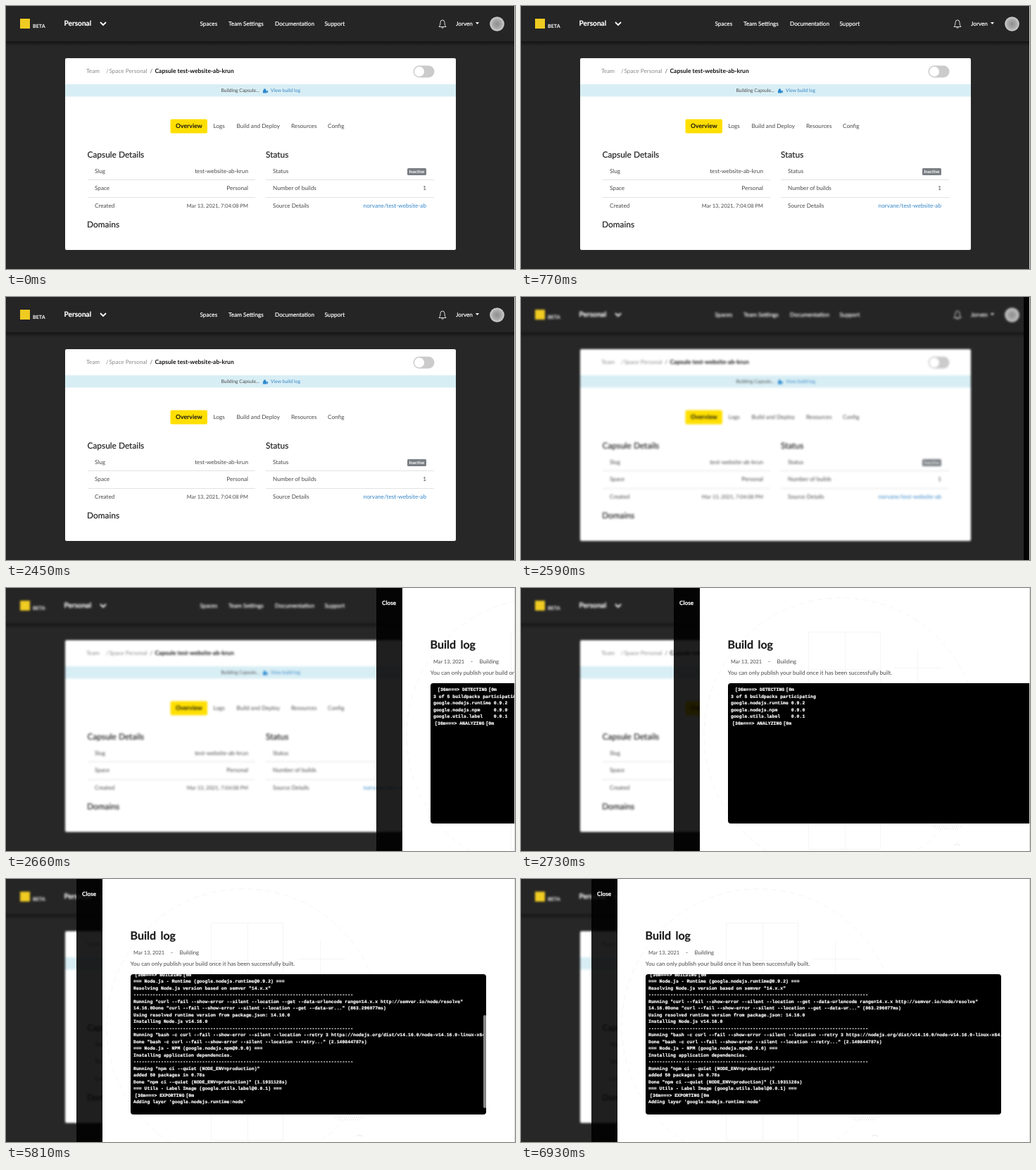
Animation of 723x373 px, one loop 8.54 s. Source, as an HTML page:

```html
<!DOCTYPE html>
<html lang="en">
<head>
<meta charset="utf-8">
<title>Build log</title>
<style>
  html, body { margin: 0; width: 100%; height: 100%; overflow: hidden; background: #272727; }
  .stage { position: relative; width: 723px; height: 373px; overflow: hidden; background: #272727; }
  svg { position: absolute; left: 0; top: 0; width: 723px; height: 373px; overflow: visible; }
  text { font: 8.2px Lato, sans-serif; fill: #4a4a4a; text-rendering: geometricPrecision; }
  .bold { font-weight: 700; }
  .white { fill: #fff; }
  .heavy { stroke: #fff; stroke-width: .2px; }
  .dark { fill: #111; }
  .muted { fill: #8b8b8b; }
  .link { fill: #3585c5; }
  .small { font-size: 6.8px; }
  .end { text-anchor: end; }
  .head { font-size: 11.9px; fill: #222; stroke: #222; stroke-width: .2px; }
  .title { font-size: 16px; word-spacing: 2.5px; fill: #1c1c1c; stroke: #1c1c1c; stroke-width: .2px; }
  .rule { stroke: #e2e2e2; stroke-width: 1; }

  .page, .panel, .thumb, .early, .late { animation: 8540ms step-end infinite; }
  .page { animation-name: blur; }
  .panel { position: absolute; inset: 0; animation-name: slide; }
  .early { animation-name: early; }
  .late { animation-name: late; }
  .thumb { animation-name: fade; }

  .term { position: absolute; left: 177px; top: 135px; width: 505px; height: 198.5px;
    border-radius: 4px; overflow: hidden; background: #000; }
  pre { position: absolute; left: 4px; margin: 0; color: #fff; white-space: pre;
    font: 700 6.5px/9.5px "Liberation Mono", monospace; text-rendering: geometricPrecision;
    -webkit-text-stroke: .22px #fff; }
  .early { top: 5px; }
  .late { top: -3.4px; }
  pre i { display: inline-block; width: 2.1px; }
  .thumb { position: absolute; right: .5px; top: 58px; width: 4px; height: 132px;
    border-radius: 2px; background: #858585; }
  .edge { position: absolute; left: 722px; top: 0; width: 1px; height: 373px; background: #dcdcdc; }

  @keyframes blur {
    0% { filter: blur(0); }
    28.688% { filter: blur(.5px); }
    29.508% { filter: blur(1px); }
    30.327%, 100% { filter: blur(1.4px); }
  }
  @keyframes slide {
    0% { transform: translateX(640px); }
    30.327% { transform: translateX(614px); }
    31.147% { transform: translateX(426px); }
    31.967% { transform: translateX(117px); }
    32.786%, 100% { transform: none; }
  }
  @keyframes early { 0% { opacity: 1; } 68.032%, 100% { opacity: 0; } }
  @keyframes late { 0% { opacity: 0; } 68.032%, 100% { opacity: 1; } }
  @keyframes fade {
    0% { opacity: 0; }
    68.032% { opacity: 1; }
    73.77% { opacity: .75; }
    74.59% { opacity: .5; }
    75.409% { opacity: .25; }
    76.229%, 100% { opacity: 0; }
  }
</style>
</head>
<body>
<div class="stage">
  <svg class="page" viewBox="0 0 723 373">
    <defs>
      <linearGradient id="shade" x2="0" y2="1">
        <stop stop-color="#141414"/><stop offset="1" stop-color="#272727"/>
      </linearGradient>
      <radialGradient id="portrait">
        <stop stop-color="#8d8d8d"/><stop offset=".6" stop-color="#a9a9a9"/><stop offset="1" stop-color="#d0d0d0"/>
      </radialGradient>
    </defs>
    <rect x="-10" y="-10" width="743" height="393" fill="#272727"/>
    <rect x="-10" y="-10" width="743" height="60" fill="#252525"/>
    <rect x="-10" y="50" width="743" height="7" fill="url(#shade)"/>

    <rect x="20" y="18" width="14" height="14" fill="#f0cb22"/>
    <text class="bold white" x="38" y="31" style="font-size:7.2px">BETA</text>
    <text class="bold white heavy" x="82.5" y="28" style="font-size:10.1px">Personal</text>
    <path d="M134 23l4 4 4-4" fill="none" stroke="#fff" stroke-width="1.8"/>
    <g class="bold heavy">
      <text class="white" x="275.5" y="27.5">Spaces</text>
      <text class="white" x="316" y="27.5">Team Settings</text>
      <text class="white" x="382" y="27.5">Documentation</text>
      <text class="white" x="452.5" y="27.5">Support</text>
      <text class="white" x="639" y="27.5">Jorven</text>
    </g>
    <path d="M615 29.5q2-1.5 2-6a3 3.6 0 0 1 6 0q0 4.5 2 6zM618.5 31h3" fill="none" stroke="#ddd"/>
    <path d="M667 23h5l-2.5 3z" fill="#fff"/>
    <circle cx="697.5" cy="25.5" r="10.3" fill="url(#portrait)"/>

    <rect x="84" y="74" width="555" height="272" rx="2" fill="#fff"/>
    <text class="muted" x="114" y="95">Team</text>
    <text class="muted" x="142" y="95">/</text>
    <text class="muted" x="146.5" y="95">Space Personal</text>
    <text x="204.5" y="95">/</text>
    <text class="bold dark" x="211.5" y="95" style="font-size:8.5px">Capsule test-website-ab-krun</text>
    <rect x="578.5" y="84.5" width="30" height="17" rx="8.5" fill="#cbcbcb"/>
    <circle cx="587" cy="93" r="7" fill="#fff"/>

    <rect x="84" y="111" width="555" height="17.5" fill="#d8eef5"/>
    <text class="small" x="305.5" y="122">Building Capsule...</text>
    <path d="M365 119.5h5v4h-5zM370 121l2-1.5v4l-2-1.5zM366 117.5h3v2h-3z" fill="#2f8ad0"/>
    <text class="small link" x="376" y="122">View build log</text>

    <rect x="233.5" y="160.5" width="52.5" height="20" rx="2" fill="#ffdf00"/>
    <text class="bold dark" x="241" y="172.8" style="font-size:8.7px">Overview</text>
    <text x="294.5" y="172.8">Logs</text>
    <text x="327.5" y="172.8">Build and Deploy</text>
    <text x="405" y="172.8">Resources</text>
    <text x="457" y="172.8">Config</text>

    <text class="head" x="115.5" y="215">Capsule Details</text>
    <text class="head" x="369" y="215">Status</text>
    <text class="head" x="115" y="314">Domains</text>
    <path class="rule" d="M116 246.5h238M116 271.5h238M369 246.5h239M369 271.5h239"/>
    <text x="126" y="236.8">Slug</text>
    <text class="end" x="344" y="236.8">test-website-ab-krun</text>
    <text x="126" y="261.3">Space</text>
    <text class="end" x="344" y="261.3">Personal</text>
    <text x="126" y="285.8">Created</text>
    <text class="end" x="344" y="285.8" style="font-size:7.5px">Mar 13, 2021, 7:04:08 PM</text>
    <text x="379" y="236.8">Status</text>
    <rect x="570" y="230" width="27" height="10" rx="1.5" fill="#7a7f84"/>
    <text class="bold white" x="583.5" y="237.3" text-anchor="middle" style="font-size:6.2px">Inactive</text>
    <text x="379" y="261.3">Number of builds</text>
    <text class="end" x="597" y="261.3">1</text>
    <text x="379" y="285.8">Source Details</text>
    <text class="link end" x="597" y="285.8">norvane/test-website-ab</text>
  </svg>

  <div class="panel">
    <svg viewBox="0 0 723 373">
      <rect x="100" width="37" height="373" fill="#000" fill-opacity=".88"/>
      <text class="bold white heavy" x="108" y="24">Close</text>
      <rect x="137" width="586" height="373" fill="#fff"/>
      <g fill="none" stroke="#f5f5f5">
        <path d="M291.5 62.5h102v308h-102zM343.5 62v310M291 115.5h103M414 113.5h68M446.5 88v48"/>
        <circle cx="338" cy="209" r="195" stroke-dasharray="8 5"/>
      </g>
      <path d="M465 335.5h45M468 338.5h40M472 341.5h32" stroke="#d8d8d8" stroke-dasharray="1 2"/>
      <path d="M498 365l4-2 5 2" fill="none" stroke="#e8e8e8"/>
      <text class="bold title" x="176.5" y="86.3">Build log</text>
      <text x="181" y="107.2" style="font-size:7.4px">Mar 13, 2021</text>
      <text x="234" y="107.2">-</text>
      <text x="246.5" y="107.2" style="font-size:7.8px">Building</text>
      <text x="176.8" y="123.3" style="font-size:8.1px">You can only publish your build once it has been successfully built.</text>
    </svg>
    <div class="term">
<pre class="early"> <i></i>[36m===&gt; DETECTING<i></i>[0m
3 of 5 buildpacks participating
google.nodejs.runtime 0.9.2
google.nodejs.npm     0.9.0
google.utils.label    0.0.1
<i></i>[36m===&gt; ANALYZING<i></i>[0m</pre>
<pre class="late"><i></i>[36m===&gt; BUILDING<i></i>[0m
=== Node.js - Runtime (google.nodejs.runtime@0.9.2) ===
Resolving Node.js version based on semver "14.x.x"
--------------------------------------------------------------------------------
Running "curl --fail --show-error --silent --location --get --data-urlencode range=14.x.x http://semver.io/node/resolve"
14.16.0Done "curl --fail --show-error --silent --location --get --data-ur..." (863.296077ms)
Using resolved runtime version from package.json: 14.16.0
Installing Node.js v14.16.0
--------------------------------------------------------------------------------
Running "bash -c curl --fail --show-error --silent --location --retry 3 https://nodejs.org/dist/v14.16.0/node-v14.16.0-linux-x64.tar.gz
Done "bash -c curl --fail --show-error --silent --location --retry..." (2.149844787s)
=== Node.js - NPM (google.nodejs.npm@0.9.0) ===
Installing application dependencies.
--------------------------------------------------------------------------------
Running "npm ci --quiet (NODE_ENV=production)"
added 50 packages in 0.78s
Done "npm ci --quiet (NODE_ENV=production)" (1.1931128s)
=== Utils - Label Image (google.utils.label@0.0.1) ===
<i></i>[36m===&gt; EXPORTING<i></i>[0m
Adding layer 'google.nodejs.runtime:node'</pre>
      <div class="thumb"></div>
    </div>
  </div>
  <div class="edge"></div>
</div>
</body>
</html>
```
